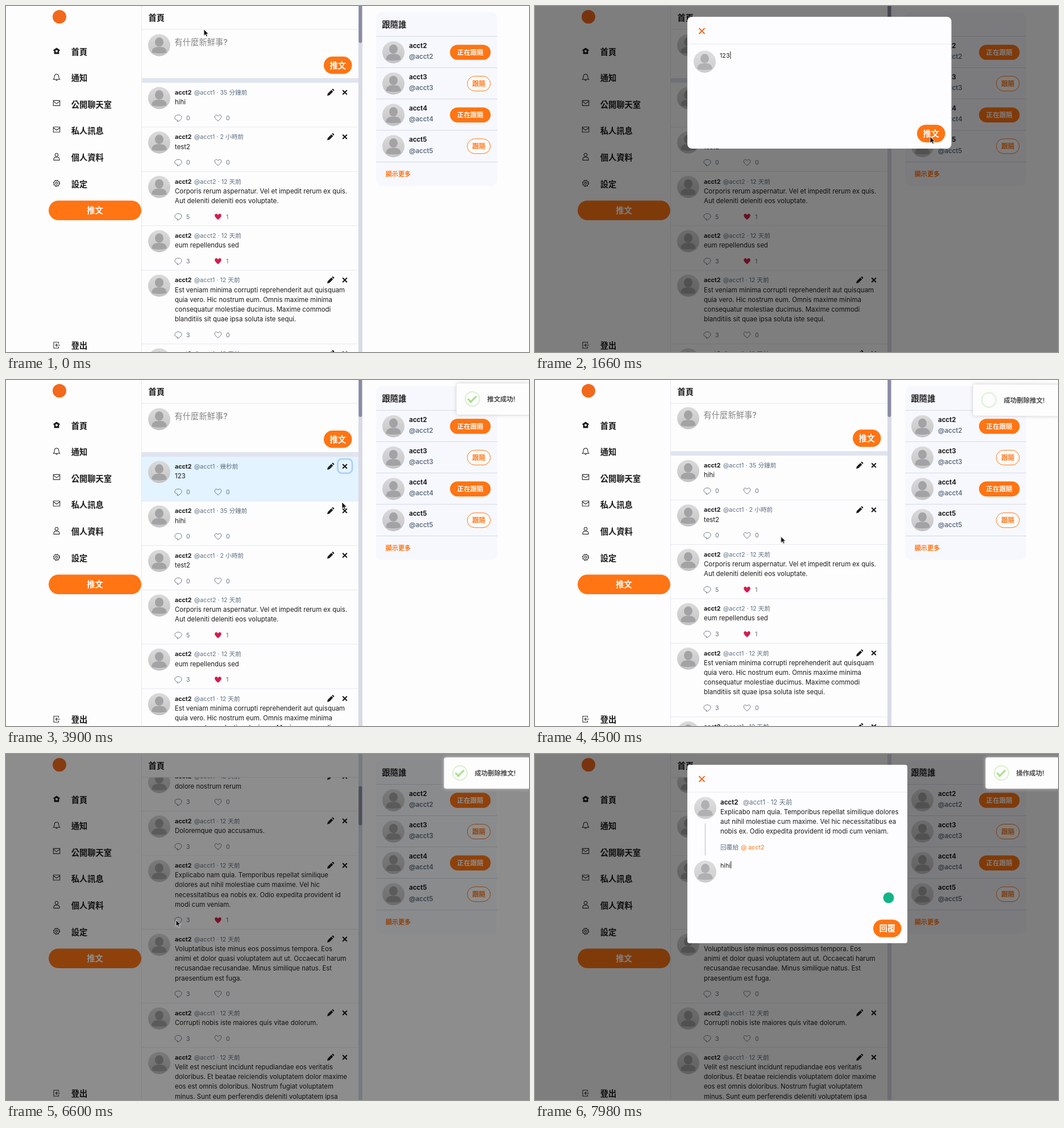
Write an HTML page that moves like this. It is 920x609 px and loops after 8000 ms.

```html
<!DOCTYPE html>
<html lang="zh-Hant">
<head>
<meta charset="utf-8">
<title>首頁</title>
<style>
  html, body { margin: 0; width: 100%; height: 100%; overflow: hidden; background: #fdfdfe; }
  svg { display: block; width: 920px; height: 609px; }
  text { font-family: Inter, "Noto Sans CJK TC", "Noto Sans CJK JP", sans-serif; white-space: pre; fill: #1c1c1c; }
  .bold { font-weight: 700; }
  .semi { font-weight: 600; }
  .medium { font-weight: 500; }
  .meta { fill: #5f7080; }
  .hint { fill: #858585; }
  .white { fill: #fff; }
  .orange { fill: #ff7413; }
  .notice { fill: #4c4c4c; }
  .line { fill: none; stroke: #333; stroke-width: 1.1; }
  .soft { fill: none; stroke: #5f6670; stroke-width: .9; }
  .rule { stroke: #e4e8ef; stroke-width: 1; }
  .hover, .ring, .modal, .toast, #backdrop, #fresh { opacity: 0; }
  .typed { fill-opacity: 0; }
  .toast, .toast rect { transform-box: fill-box; transform-origin: center; }
  .toast .card { filter: drop-shadow(0 0 3px #c9c9c9); }
</style>
</head>
<body>
<svg id="stage" viewBox="0 0 920 609">
  <defs>
    <linearGradient id="grey" x2="0" y2="1"><stop stop-color="#dadada"/><stop offset="1" stop-color="#c4c4c4"/></linearGradient>
    <clipPath id="disc"><circle r="19.5"/></clipPath>
    <clipPath id="column"><rect x="238" y="0" width="382" height="609"/></clipPath>
    <g id="avatar">
      <circle r="19.5" fill="url(#grey)"/>
      <g fill="#a3a3a5" clip-path="url(#disc)"><ellipse cy="-5.5" rx="7.5" ry="8.2"/><path d="M-13 13C-13 4-7 3 0 3S13 4 13 13Q0 16-13 13Z"/></g>
    </g>
    <path id="bubble" class="soft" d="M0-5.2C-4-5.2-6-3-6-.6S-4 3.9-1.5 3.9V6.3C3 4.8 6 2.2 6-.6S4-5.2 0-5.2Z"/>
    <path id="heart" d="M0 5.4C-3.5 2.7-5.8.5-5.8-2.2C-5.8-5.4-1.8-6.4 0-3C1.8-6.4 5.8-5.4 5.8-2.2C5.8.5 3.5 2.7 0 5.4Z"/>
    <path id="pencil" fill="#1c1c1c" d="M-6 6L-5 2L1.3-4.3L4.3-1.3L-2 5ZM2.2-5.2L3.3-6.2Q4-6.6 4.6-6L6-4.6Q6.6-4 6.2-3.3L5.2-2.2Z"/>
    <path id="cross" d="M-3.8-3.8L3.8 3.8M3.8-3.8L-3.8 3.8"/>
    <path id="close" d="M-5-5L5 5M5-5L-5 5"/>
    <path id="home" fill="#1c1c1c" fill-rule="evenodd" d="M0-5.5L6-1.5L5 0H4.4V5.5H-4.4V0H-5L-6-1.5ZM0-1.6A2 2 0 1 0 0 2.4A2 2 0 1 0 0-1.6Z"/>
    <path id="bell" class="line" d="M-5.5 3.6C-3.5 2-4-1-3.6-2.6C-3-6.6 3-6.6 3.6-2.6C4-1 3.5 2 5.5 3.6ZM-1.5 4.2Q0 7 1.5 4.2"/>
    <path id="mail" class="line" d="M-5.7-4.5H5.7V4.5H-5.7ZM-5.7-3.2L0 1L5.7-3.2"/>
    <path id="person" class="line" d="M-2.7-3.3A2.7 2.9 0 1 1 2.7-3.3A2.7 2.9 0 1 1-2.7-3.3ZM-5 6V4Q-4.5.8-2 .8H2Q4.5.8 5 4V6Z"/>
    <g id="gear" class="line"><circle r="1.9"/><circle r="4.6"/><circle r="5.6" stroke-dasharray="2.2 2.2"/></g>
    <path id="exit" class="line" d="M3.5-2.5V-5.3H-5V5.3H3.5V2.5M6 0H-1.5M1-2.6L-1.6 0L1 2.6"/>
  </defs>
</svg>
<script>
const LOOP = 8000, POST = 61.15, LINE = 17.15, ONE = POST + LINE, SCROLL = 572.6;
const stage = document.getElementById('stage');

// ---------- drawing helpers: y is the visual middle of the text ----------
const text = (x, y, s, size = 11.44, cls = '', anchor = 'start') =>
  `<text x="${x}" y="${y + size * .37}" font-size="${size}" class="${cls}" text-anchor="${anchor}">${s}</text>`;
const use = (id, x, y, attrs = '') => `<use href="#${id}" x="${x}" y="${y}" ${attrs}/>`;
const rect = (x, y, w, h, fill, attrs = '') =>
  `<rect x="${x}" y="${y}" width="${w}" height="${h}" fill="${fill}" ${attrs}/>`;
const rule = (x1, x2, y) => `<path class="rule" d="M${x1} ${y}H${x2}"/>`;
const pill = (x, y, w, h, label, size = 14.3, filled = true) =>
  rect(x, y, w, h, filled ? '#ff7413' : '#fdfdfe', `rx="${h / 2}" ${filled ? '' : 'stroke="#ff7413"'}`) +
  text(x + w / 2, y + h / 2, label, size, 'bold ' + (filled ? 'white' : 'orange'), 'middle');

// ---------- sidebar ----------
const menu = [['home', '首頁'], ['bell', '通知'], ['mail', '公開聊天室'],
  ['mail', '私人訊息'], ['person', '個人資料'], ['gear', '設定']];
const sidebar = '<circle cx="94" cy="19" r="12" fill="#f2691c"/>' +
  menu.map(([icon, label], i) =>
    use(icon, 89, 79 + 46.6 * i - (icon === 'mail' ? 1.3 : 0)) +
    text(114.7, 80.3 + 46.6 * i, label, 14.3, 'bold')).join('') +
  pill(75, 342.5, 163, 34.5, '推文') +
  use('exit', 89, 597) + text(114.7, 598, '登出', 14.3, 'bold');

// ---------- feed ----------
const likeMark = (y, on, count) => `<g class="${on ? 'on' : 'off'}">` +
  use('heart', 373, y, on ? 'fill="#d01f4d"' : 'class="soft"') +
  text(387, y, count, 10.7, 'meta') + '</g>';

function post(y, { id, handle = 1, when = '12 天前', body, comments = 3, likes = 0, both }) {
  const lines = body.split('\n'), h = POST + LINE * lines.length, footer = y + h - 16.3;
  const edit = handle === 1
    ? use('pencil', 571, y + 17) + use('cross', 596, y + 17, 'stroke="#1c1c1c" stroke-width="2.1"') : '';
  return `<g ${id ? `id="${id}"` : ''}>` + rect(239, y, 381, h, '#e3f3ff', 'class="hover"') +
    use('avatar', 269.5, y + 27) +
    text(297, y + 17, 'acct2', 10.7, 'bold') +
    text(331, y + 17, `@acct${handle} · ${when}`, 10.7, 'meta') +
    lines.map((s, i) => text(297, y + 34 + LINE * i, s)).join('') +
    use('bubble', 303, footer) + text(317, footer, comments, 10.7, 'meta') +
    (both ? likeMark(footer, false, 0) + likeMark(footer, true, 1) : likeMark(footer, likes > 0, likes)) +
    edit + rule(239, 620, y + h - .3) + '</g>';
}

const posts = [
  { when: '35 分鐘前', body: 'hihi', comments: 0 },
  { when: '2 小時前', body: 'test2', comments: 0 },
  { handle: 2, body: 'Corporis rerum aspernatur. Vel et impedit rerum ex quis.\nAut deleniti deleniti eos voluptate.', comments: 5, likes: 1 },
  { handle: 2, body: 'eum repellendus sed', likes: 1 },
  { body: 'Est veniam minima corrupti reprehenderit aut quisquam\nquia vero. Hic nostrum eum. Omnis maxime minima\nconsequatur molestiae ducimus. Maxime commodi\nblanditiis sit quae ipsa soluta iste sequi.' },
  { body: 'dolore nostrum rerum' },
  { body: 'Doloremque quo accusamus.' },
  { id: 'liked', both: true, body: 'Explicabo nam quia. Temporibus repellat similique\ndolores aut nihil molestiae cum maxime. Vel hic\nnecessitatibus ea nobis ex. Odio expedita provident id\nmodi cum veniam.' },
  { body: 'Voluptatibus iste minus eos possimus tempora. Eos\nanimi et dolor quasi voluptatem aut ut. Occaecati harum\nrecusandae recusandae. Minus similique natus. Est\npraesentium est fuga.' },
  { body: 'Corrupti nobis iste maiores quis vitae dolorum.' },
  { body: 'Velit est nesciunt incidunt repudiandae eos veritatis\ndoloribus. Et beatae reiciendis voluptatem dolor maxime\neos est omnis doloribus. Nostrum fugiat voluptatem\nminus. Sunt eum perferendis deleniti voluptatem ipsa' },
];
let nextY = 135;
const list = posts.map(p => {
  const html = post(nextY, p);
  nextY += POST + LINE * p.body.split('\n').length;
  return html;
}).join('');

const feed = `<g clip-path="url(#column)"><g id="feed">` +
  use('avatar', 269.5, 69) + text(296.5, 64, '有什麼新鮮事?', 14.3, 'medium hint') +
  pill(559, 89, 49.5, 30.5, '推文') + rect(239, 127, 381, 8, '#e0e4ef') +
  `<g id="list">${list}</g>` +
  post(135, { id: 'fresh', when: '幾秒前', body: '123', comments: 0 }) +
  '<rect class="ring" x="583.5" y="139" width="25.5" height="25" rx="7" fill="none" stroke="#a9cff5" stroke-width="2.6"/></g>' +
  rect(239, 0, 381, 41, '#fdfdfe') + rule(239, 620, 41) + text(250.5, 20.5, '首頁', 14.3, 'bold') + '</g>' +
  '<path class="rule" d="M238.5 0V609"/>' + rect(620, 0, 7, 609, '#d9dae6') +
  rect(620.3, -4, 6, 69, '#8b8ba3', 'id="thumb" rx="3"');

// ---------- who to follow ----------
const panel = rect(651, 11, 213, 305.5, '#f7f8fd', 'rx="10"') + text(661.5, 32.5, '跟隨誰', 14.3, 'bold') +
  [2, 3, 4, 5].map((n, i) => {
    const y = 81.5 + 55.1 * i;
    return `<path d="M651 ${y - 28}H864" stroke="#d3d9e2"/>` + use('avatar', 681.5, y) +
      text(709, y - 12, 'acct' + n, 11.44, 'bold') + text(709, y + 7.5, '@acct' + n, 11.44, 'semi meta') +
      (i % 2 ? pill(811.5, y - 13, 40.5, 26, '跟隨', 11.6, false) : pill(781, y - 13.3, 71.5, 26.6, '正在跟隨', 11.6));
  }).join('') + '<path d="M651 274.5H864" stroke="#d3d9e2"/>' + text(667.7, 295.5, '顯示更多', 11.1, 'semi orange');

// ---------- dialogs ----------
const typing = (x, y, word) => `<text x="${x}" y="${y + 4}" font-size="10.7">` +
  [...word].map(c => `<tspan class="typed">${c}</tspan>`).join('') + '</text>' +
  `<path class="caret" d="M${x + .5} ${y - 7}v13" stroke="#222" opacity="0"/>`;
const dialog = (id, w, h, r, inner) => `<g id="${id}" class="modal">` + rect(268, 19, w, h, '#fdfdff', `rx="${r}"`) +
  use('close', 293.5, 44, 'stroke="#f2691c" stroke-width="1.9"') + rule(268, 268 + w, 67) + inner + '</g>';
const dialogs = '<rect id="backdrop" width="920" height="609"/>' +
  dialog('compose', 464.5, 232, 8,
    use('avatar', 298.5, 98, 'opacity=".85"') +
    '<g class="placeholder">' + text(325, 87, '有什麼新鮮事?&#160;&#160;&#160;(字數限制 140 字元)', 10.7, 'hint') + '</g>' +
    typing(325, 87, '123') + pill(672, 209, 49.5, 31, '推文')) +
  dialog('reply', 387, 314, 4,
    use('avatar', 299.5, 95, 'opacity=".85"') + use('avatar', 299.5, 207, 'opacity=".85"') +
    '<path d="M299.5 122V179" stroke="#c9ced8" stroke-width="1.5"/>' +
    text(326, 84.5, 'acct2', 11.44, 'bold') + text(366, 84.5, '@acct1 · 12 天前', 11.44, 'meta') +
    ['Explicabo nam quia. Temporibus repellat similique dolores',
     'aut nihil molestiae cum maxime. Vel hic necessitatibus ea',
     'nobis ex. Odio expedita provident id modi cum veniam.']
      .map((s, i) => text(326, 101.5 + LINE * i, s)).join('') +
    text(326, 164, '回覆給', 10.7, 'meta') + text(362, 164, '@ acct2', 10.7, 'orange') +
    typing(326, 195.5, 'hihi') + '<circle class="helper" cx="622" cy="253" r="9.5" fill="#15b388"/>' +
    pill(595, 291.5, 49.5, 31, '回覆'));

// ---------- toasts ----------
const toast = (id, x, label) => `<g id="${id}" class="toast">` +
  rect(x, 6, 922 - x, 55, '#fdfdfe', 'rx="4" class="card"') +
  `<circle cx="${x + 28}" cy="33.3" r="12.6" fill="none" stroke="#a5dc86" stroke-opacity=".4" stroke-width="2"/>` +
  `<g transform="translate(${x + 28} 33.3)" fill="#a5dc86"><rect class="tip" height="3"/><rect class="long" height="3"/></g>` +
  text(x + 54, 33.5, label, 11.44, 'semi notice') + '</g>';

const cursor = '<path id="cursor" d="M0 0V11.5L2.7 9L4.5 13L6.5 12.1L4.8 8.2H8.4Z" fill="#111" stroke="#fff" stroke-width=".8"/>';

stage.insertAdjacentHTML('beforeend', sidebar + feed + panel + dialogs +
  toast('sent', 792.5, '推文成功!') + toast('removed', 770.5, '成功刪除推文!') +
  toast('done', 792.5, '操作成功!') + cursor);

// ---------- motion: [ms, properties] tables on one shared loop ----------
const HOLD = 'steps(1, end)';
function track(target, steps, easing = 'linear') {
  const el = typeof target === 'string' ? stage.querySelector(target) : target;
  const all = [[0, steps[0][1]], ...steps, [LOOP, steps.at(-1)[1]]];
  el.animate(all.map(([t, props]) => ({ easing, ...props, offset: t / LOOP })),
    { duration: LOOP, iterations: Infinity });
}
const show = (target, from, to = LOOP, prop = 'opacity') =>
  track(target, [[0, { [prop]: 0 }], [from, { [prop]: 1 }], [to, { [prop]: 0 }]].filter(s => s[0] < LOOP), HOLD);
const move = (x, y) => ({ transform: `translate(${x}px, ${y}px)` });
const dim = v => ({ opacity: v });

const FRESH = 1900, GONE = 4200;
track('#list', [[0, move(0, 0)], [FRESH, move(0, ONE)], [GONE, move(0, 0)]], HOLD);
show('#fresh', FRESH, GONE);
show('#fresh .hover', 2870, GONE);
show('.ring', 3200, GONE);
track('#feed', [[4480, move(0, 0)], [5000, move(0, -SCROLL)]], 'ease-in-out');
track('#thumb', [[4480, move(0, 0)], [5000, move(0, 60.5)]], 'ease-in-out');
show('#liked .hover', 5000, 6450);
show('#liked .on', 5560);
track('#liked .off', [[0, dim(1)], [5560, dim(0)]], HOLD);

track('#backdrop', [[200, dim(0)], [340, dim(.5)], [1760, dim(.5)], [1900, dim(0)],
  [6450, dim(0)], [6620, dim(.5)]]);

function openDialog(sel, from, to) {
  const up = { ...dim(0), ...move(0, -36) }, down = { ...dim(1), ...move(0, 0) };
  const steps = [[from, up], [from + 240, down]];
  if (to) steps.push([to, down], [to + 120, up]);
  track(sel, steps, 'ease-out');
}
openDialog('#compose', 280, 1700);
openDialog('#reply', 6640);

function typeIn(sel, times, widths) {
  const box = stage.querySelector(sel);
  box.querySelectorAll('.typed').forEach((c, i) => show(c, times[i], LOOP, 'fillOpacity'));
  let x = 0;
  track(box.querySelector('.caret'), [[0, { ...dim(0), ...move(0, 0) }],
    ...times.map((t, i) => [t, { ...dim(1), ...move(x += widths[i], 0) }])], HOLD);
}
typeIn('#compose', [900, 1040, 1180], [5, 6.6, 6.7]);
track('.placeholder', [[0, dim(1)], [900, dim(0)]], HOLD);
typeIn('#reply', [7480, 7600, 7720, 7840], [6.4, 2.7, 6.4, 2.7]);
show('.helper', 7480);

function playToast(id, start, end = LOOP) {
  const em = 11.44;
  const tilt = (y, deg, opacity = 1) => ({ opacity, transform: `translateY(${y}px) rotate(${deg}deg)` });
  const steps = [[start - 1, tilt(-7, 2, 0)], [start, tilt(-7, 2)], [start + 165, tilt(0, -2)],
    [start + 330, tilt(3.5, 2)], [start + 500, tilt(0, 0)]];
  if (end < LOOP) steps.push([end - 100, tilt(0, 0)], [end, tilt(0, 1, 0)]);
  track('#' + id, steps);
  // each stroke: share of 750 ms, then left, top and width in em
  const stroke = (cls, deg, rows) => track(`#${id} .${cls}`, rows.map(([p, left, y, w]) => [start + 750 * p, {
    x: (left - 1) * em + 'px', y: (y - 1) * em + 'px', width: w * em + 'px', transform: `rotate(${deg}deg)` }]));
  stroke('tip', 45, [[0, .06, .56, 0], [.54, .125, .125, 0], [.7, -.25, .625, 1.625], [.84, .75, 1.06, .5], [1, .19, 1.125, .75]]);
  stroke('long', -45, [[0, .625, 1.625, 0], [.65, .625, 1.625, 0], [.84, .875, .94, 1.125], [1, .44, .94, 1.375]]);
}
playToast('sent', 1910, 4220);
playToast('removed', 4240, 7000);
playToast('done', 7020);

const trail = [[0, 348, 41], [220, 346, 62], [420, 356, 70], [1280, 356, 70], [1600, 695, 230], [2450, 695, 230],
  [3000, 594, 151], [3350, 594, 151], [3700, 591, 215], [4150, 591, 215], [4700, 373, 298], [5750, 373, 298],
  [6200, 299, 292], [6900, 299, 292]];
track('#cursor', trail.map(([t, x, y]) => [t, move(x, y)]), 'ease-in-out');
track('#cursor', [[0, dim(1)], [900, dim(0)], [1280, dim(1)], [7000, dim(0)]], HOLD);
</script>
</body>
</html>
```
